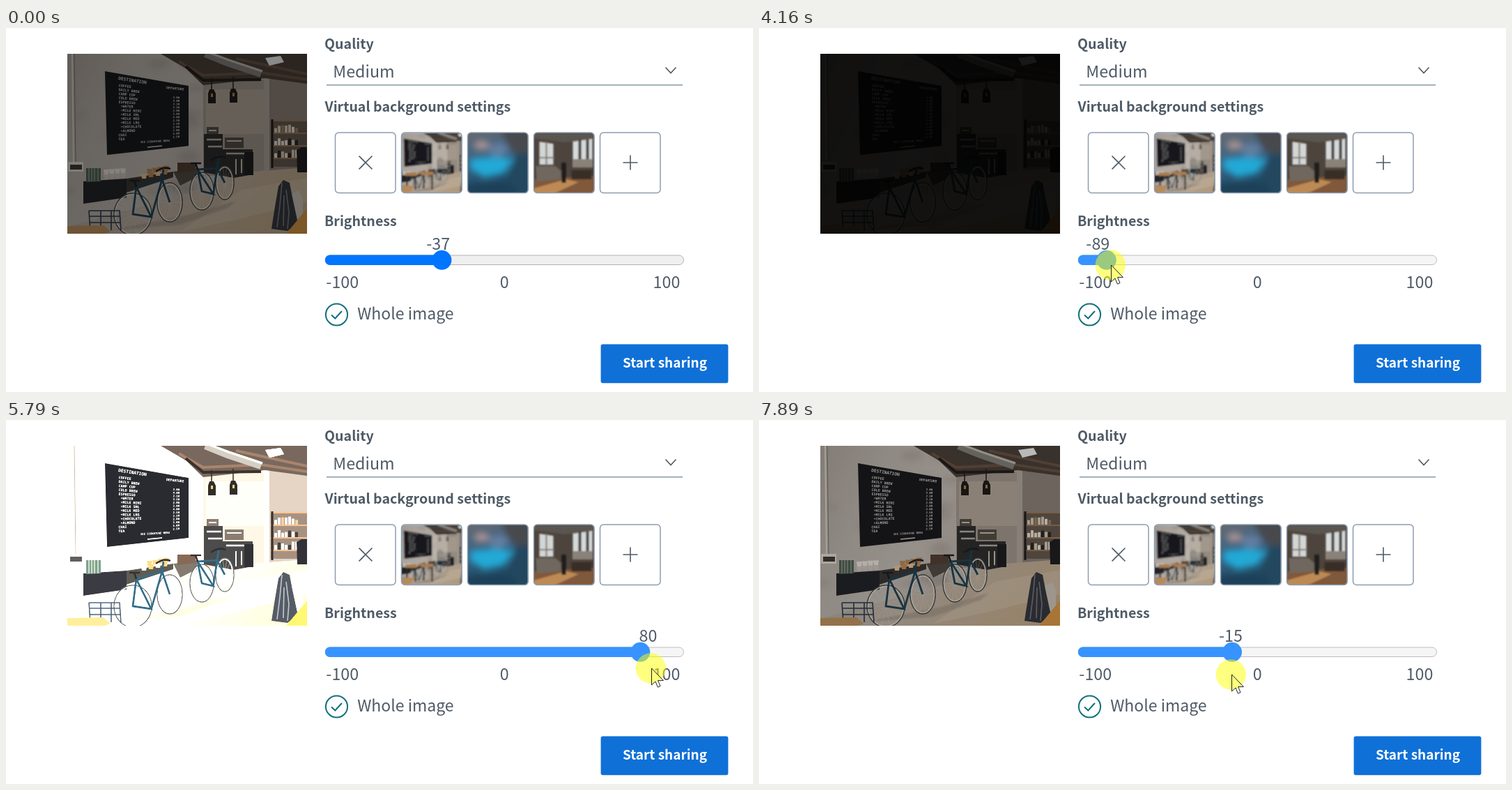
Animation, 1072 px wide and 522 px high, one loop 8 s. Source, as an HTML page:

```html
<!DOCTYPE html>
<html lang="en">
<head>
<meta charset="utf-8">
<title>Brightness slider</title>
<style>
  html, body { margin: 0; width: 100%; height: 100%; overflow: hidden; background: #fff; }
  svg { display: block; width: 1072px; height: 522px; }
  text { font-family: "Noto Sans CJK SC", "Noto Sans CJK JP", "Noto Sans CJK", "Open Sans", sans-serif; fill: #4e5a66; }
  .head { font-size: 19.6px; font-weight: 700; }
  .body { font-size: 23.3px; }
  .mid { text-anchor: middle; }
  .icon { fill: none; stroke: #4e5a66; stroke-width: 1.6; }
  .frame { fill: none; stroke: #8c9db0; stroke-width: 1.5; }
  #board text { font-family: "Noto Sans Mono", "DejaVu Sans Mono", monospace; font-weight: 700; fill: #bdbbb6; }
</style>
</head>
<body>
<svg viewBox="0 0 1072 522" xmlns="http://www.w3.org/2000/svg">
  <defs>
    <linearGradient id="wall" x2="1" y2=".35">
      <stop offset="0" stop-color="#9a928a"/><stop offset=".25" stop-color="#a8a19a"/>
      <stop offset=".5" stop-color="#b0a9a2"/><stop offset="1" stop-color="#a69d94"/>
    </linearGradient>
    <linearGradient id="floor" x2="1" y2=".3">
      <stop offset="0" stop-color="#989289"/><stop offset=".5" stop-color="#ada297"/><stop offset="1" stop-color="#b09a7e"/>
    </linearGradient>
    <linearGradient id="night" x2=".3" y2="1">
      <stop offset="0" stop-color="#66686f"/><stop offset=".5" stop-color="#386485"/><stop offset="1" stop-color="#1b4259"/>
    </linearGradient>
    <filter id="soft" x="-50%" y="-50%" width="200%" height="200%"><feGaussianBlur stdDeviation="5"/></filter>
    <filter id="slight"><feGaussianBlur stdDeviation=".8"/></filter>
    <clipPath id="photoClip"><rect x="88" y="37" width="344" height="258"/></clipPath>
    <clipPath id="tile"><rect width="87" height="87" rx="5"/></clipPath>

    <g id="photo">
      <rect x="88" y="37" width="344" height="258" fill="url(#wall)"/>
      <g id="stains" fill="#6f655b" fill-opacity=".22" filter="url(#soft)"/>
      <!-- back room and ceiling -->
      <path d="M283 74H432V212H283Z" fill="#938a80"/>
      <path d="M287 88H370V152H287Z" fill="#a2978b"/>
      <path d="M370 66H432V212H370Z" fill="#80766d"/>
      <path d="M370 66H378V208H370Z" fill="#a0978d"/>
      <path d="M222 37H432V80L372 72 283 82 258 58Z" fill="#433a34"/>
      <path d="M248 48 283 68 366 64 432 74M330 44 432 66" fill="none" stroke="#5e4a3c" stroke-width="4"/>
      <path d="M286 37 318 50 366 66" fill="none" stroke="#77736d" stroke-width="10"/>
      <path d="M288 34 320 46 368 62" fill="none" stroke="#aca69e" stroke-width="3"/>
      <path d="M258 55 283 75 366 74" fill="none" stroke="#211b18" stroke-width="4"/>
      <path d="M372 43 394 40 399 49 378 54Z" fill="#d9dbd9"/>
      <!-- floor -->
      <path d="M432 200 340 207 262 237 88 285V295H432Z" fill="url(#floor)"/>
      <path d="M338 232 432 215V250L330 275 250 292Z" fill="#c0b19d" opacity=".5"/>
      <path d="M150 290 262 268 330 248 318 258 250 282Z" fill="#6d655d" opacity=".3" filter="url(#slight)"/>
      <!-- cord and outlet -->
      <path d="M95 37 97 192" stroke="#c2beb8" stroke-width="2"/>
      <path d="M98 37 100 192" stroke="#6e6760" stroke-width="1"/>
      <rect x="89" y="192" width="22" height="14" fill="#c9c5bd"/>
      <path d="M92 196H109V203H92Z" fill="#383532"/>
      <!-- lamps -->
      <path d="M295 72V88M326 70V87" stroke="#1f1a18" stroke-width="1.5"/>
      <path d="M292 88H298L301 94V108H290V94ZM323 87H329L332 93V107H321V93Z" fill="#1c1918"/>
      <path d="M294 94H297V99H294ZM325 93H328V98H325Z" fill="#a8743d"/>
      <!-- counter -->
      <path d="M284 152H311V174H354V210L327 215 284 207Z" fill="#2b2a2a"/>
      <path d="M288 160H309M290 170H310M316 180H350" stroke="#a39d94" stroke-width="2.5"/>
      <path d="M288 142H305V152H288ZM314 157H341V172H314Z" fill="#4d463f"/>
      <path d="M317 162H338M291 147H302M330 188V210M338 188V208" stroke="#b5aca0" stroke-width="2"/>
      <path d="M342 178H355V211H342Z" fill="#1c1c1e"/>
      <!-- shelves -->
      <path d="M380 132H432V199H380Z" fill="#5d5148"/>
      <g id="goods"/>
      <path d="M380 133H432M380 151H432M380 169H432M380 187H432" stroke="#8b6d50" stroke-width="2"/>
      <path d="M382 131V201" stroke="#1d1b1a" stroke-width="3"/>
      <path d="M417 175 424 171H432V207H418Z" fill="#1c1c1f"/>
      <!-- ledge with cups -->
      <path d="M111 220 173 216V243L111 252Z" fill="#202125"/>
      <path d="M173 216 240 206V214L173 236Z" fill="#35332f"/>
      <path d="M240 206 274 201V214L250 226Z" fill="#4a443e"/>
      <path d="M115 201H136V220L115 221Z" fill="#465a50"/>
      <path d="M119 201V220M123 201V220M127 201V220M132 201V220" stroke="#a69e8e"/>
      <g id="cups"/>
      <path d="M246 193H272V205L246 208Z" fill="#4b3b2f"/>
      <!-- board -->
      <path d="M142 62 262 83V169L145 182Z" fill="#17181b"/>
      <g id="board"/>
      <g id="bikes" fill="none"/>
      <!-- chair, coat, tables -->
      <path d="M119 262H163L165 291M119 262 121 291M119 270H164M120 279H165M136 262V290M151 262V290" fill="none" stroke="#263446" stroke-width="1.6"/>
      <path d="M88 284 140 283 150 292 142 295H88Z" fill="#ad8557"/>
      <path d="M407 239 420 233 426 243V266L410 286Z" fill="#b9b1a6"/>
      <path d="M391 227 398 218 407 222 411 243 419 280 404 291 381 288 386 256Z" fill="#303338"/>
      <path d="M396 222 393 254 389 286M402 232 406 264 404 288M399 240 398 284" fill="none" stroke="#6d7074" stroke-width="1.6"/>
      <path d="M402 295 432 259V295Z" fill="#c58a40"/>
    </g>
  </defs>

  <g clip-path="url(#photoClip)"><g id="preview"><use href="#photo"/></g></g>

  <text class="head" x="457" y="29.5">Quality</text>
  <text class="body" x="469.3" y="71">Medium</text>
  <path d="M460 81.8H971" stroke="#9eacb9" stroke-width="2"/>
  <path class="icon" d="M946.5 56.5 954 64.5 961.5 56.5"/>
  <text class="head" x="457.5" y="119.5">Virtual background settings</text>

  <g transform="translate(567.5 150)" clip-path="url(#tile)">
    <g filter="url(#slight)">
      <use href="#photo" transform="translate(-15 0) scale(.338) translate(-88 -37)"/>
      <path d="M44 14H66V52H44Z" fill="#c4bcb4" opacity=".6"/>
      <path d="M8 60V80M20 60V82M32 58V80M44 60V82" stroke="#2b2c2f" stroke-width="2"/>
      <path d="M6 57H22V62H6ZM28 56H46V61H28Z" fill="#a87c4f"/>
      <path d="M0 76H20L12 87H0Z" fill="#b58a5c"/>
    </g>
  </g>
  <g transform="translate(662.5 150)" clip-path="url(#tile)">
    <rect width="87" height="87" fill="url(#night)"/>
    <g filter="url(#soft)">
      <path d="M45 -8H95V42L62 26Z" fill="#46494d"/>
      <path d="M70 30H95V95H50Z" fill="#21475f"/>
      <ellipse cx="20" cy="18" rx="11" ry="7" fill="#a58f92"/>
      <ellipse cx="44" cy="24" rx="14" ry="9" fill="#647ea0"/>
      <path d="M4 38 40 34 66 38 52 58 24 64 4 52Z" fill="#22a9d6"/>
      <ellipse cx="28" cy="82" rx="45" ry="9" fill="#1a4059"/>
    </g>
  </g>
  <g transform="translate(757.5 150)" clip-path="url(#tile)">
    <rect width="87" height="87" fill="#4d443d"/>
    <g filter="url(#slight)">
      <path d="M0 0H87V9L44 14 0 8Z" fill="#5a5550"/>
      <path d="M8 13 28 16V46H8Z" fill="#d3d6d6"/>
      <path d="M18 13V47M8 36H29" stroke="#7d756d" stroke-width="2"/>
      <path d="M56 13 84 9V50H56Z" fill="#d5dadb"/>
      <path d="M66 10V51M77 10V51" stroke="#463d37" stroke-width="4"/>
      <path d="M56 38H84V50H56Z" fill="#8a8279"/>
      <path d="M0 67 87 62V87H0Z" fill="#80583a"/>
      <path d="M0 80 46 67 64 71 30 87H0Z" fill="#bd8a54"/>
      <path d="M3 48H31L39 55V67L4 70Z" fill="#70675f"/>
      <path d="M40 43H46V72H40Z" fill="#1d1c1d"/>
      <path d="M54 54H83V67H54Z" fill="#382e28"/>
    </g>
  </g>
  <g id="frames"></g>
  <path class="icon" d="M506.5 183.5 525.5 202.5M525.5 183.5 506.5 202.5M885.5 193H906.5M896 182.5V203.5"/>

  <text class="head" x="457" y="284">Brightness</text>
  <text class="body mid" id="value" y="318"></text>
  <rect id="track" x="458.5" y="326" width="514" height="13.5" rx="6.75"/>
  <path id="fill"/>
  <circle id="thumb" cy="332.8" r="14"/>
  <text class="body mid" x="482.8" y="372.5">-100</text>
  <text class="body mid" x="715.3" y="372.5">0</text>
  <text class="body mid" x="948" y="372.5">100</text>

  <circle cx="474.5" cy="411" r="15.6" fill="none" stroke="#10707d" stroke-width="2"/>
  <path d="M467 411.5 472.3 416.5 482 406" fill="none" stroke="#10707d" stroke-width="2"/>
  <text class="body mid" x="573.4" y="417.5" style="font-size:23px">Whole image</text>
  <rect x="853.6" y="453.6" width="182.8" height="55.6" rx="3" fill="#0f70d7"/>
  <text class="head mid" x="945.5" y="487" style="font-size:19px;fill:#fff">Start sharing</text>

  <g id="cursor">
    <path id="arrow" d="M.5 0V24L6 19 9.4 27.2 13 25.6 9.6 17.6H17.4Z" fill="#fff"/>
    <circle cx="-.7" r="21.7" fill="#ff0" fill-opacity=".5"/>
    <use href="#arrow" style="fill-opacity:0" stroke="#222" stroke-width="1"/>
  </g>
</svg>
<script>
const LOOP = 8000, PRESS = 1550, LAG = 60;
const $ = id => document.getElementById(id);

function add(parent, tag, attrs, text) {
  const el = document.createElementNS('http://www.w3.org/2000/svg', tag);
  for (const key in attrs) el.setAttribute(key, attrs[key]);
  if (text) el.textContent = text;
  $(parent).append(el);
}

let seed = 7;
const rand = (a, b) => {
  seed = seed * 16807 % 2147483647;
  return a + (b - a) * seed / 2147483647;
};

function drawBoard() {
  const items = ['COFFEE', 'DAILY BREW', 'CAMP CUP', 'COLD BREW', 'ESPRESSO', '+WATER', '+MILK MINI',
    '+MILK SML', '+MILK MED', '+MILK LRG', '+CHOCOLATE', '+ALMOND', 'CHAI', 'TEA'];
  const line = (x, y, angle, size, text) =>
    add('board', 'text', { transform: `translate(${x} ${y}) rotate(${angle})`, 'font-size': size }, text);
  line(161, 74, 9, 6.2, 'DESTINATION');
  line(230, 87, 6, 4.7, 'DEPARTURE');
  items.forEach((item, i) => {
    const indent = item[0] === '+' ? 3 : 0;
    line(161.5 + indent, 84 + i * 5.95, 7 - i * .8, 5, item);
    if (i) line(239.5, 96 + i * 4.75, 4 - i * .6, 4, (2 + i * 7 % 5 * .5).toFixed(2));
  });
  line(193, 165, -3, 3.9, 'SEE SIGNATURE MENU');
  add('board', 'path', { d: 'M203 171 224 169', stroke: '#b5b3ae', 'stroke-width': 1.5 });
}

function drawBike(rear, front, saddle, bars) {
  for (const [x, y, rx, ry] of [rear, front]) {
    const rim = (grow, stroke, width) =>
      add('bikes', 'ellipse', { cx: x, cy: y, rx: rx + grow, ry: ry + grow, stroke, 'stroke-width': width });
    rim(0, '#3a3d3e', 1.5);
    rim(-1.5, '#c9c2b6', 1.5);
    for (let i = 0; i < 7; i++) {
      const a = i * Math.PI / 7, dx = rx * Math.cos(a), dy = ry * Math.sin(a);
      add('bikes', 'path', { d: `M${x - dx} ${y - dy}L${x + dx} ${y + dy}`, stroke: '#c8c0b4', 'stroke-width': .3 });
    }
  }
  const crank = [(rear[0] + front[0]) / 2, rear[1] + 4];
  const post = [saddle[0] + 3, saddle[1] + 9], head = [bars[0] - 2, bars[1] + 14];
  const [r, f] = [rear, front].map(w => w.slice(0, 2));
  add('bikes', 'path', { d: `M${r}L${post}L${crank}ZM${post}L${head}L${crank}M${bars}L${head}L${f}`, stroke: '#1d3d4d', 'stroke-width': 2.8 });
  add('bikes', 'path', { d: `M${saddle}L${post}M${saddle[0] - 7} ${saddle[1]}h15M${bars[0] - 11} ${bars[1] + 3}Q${bars[0]} ${bars[1] - 5} ${bars[0] + 10} ${bars[1] - 1}`, stroke: '#1b1c1e', 'stroke-width': 2.6 });
}

function drawDetails() {
  for (let i = 0; i < 26; i++)
    add('stains', 'ellipse', { cx: rand(92, 275), cy: rand(40, 250), rx: rand(4, 22), ry: rand(3, 13) });
  for (let row = 0; row < 3; row++)
    for (let x = 385; x < 416; x += 5) {
      const h = rand(6, 12);
      add('goods', 'rect', { x, y: 150 + row * 18 - h, width: 4, height: h, fill: ['#c1b6a5', '#8d745a', '#272523', '#d6cec0'][Math.floor(rand(0, 4))] });
    }
  const cup = (x, y, fill) => add('cups', 'path', { d: `M${x} ${y}h8l-1 7h-6z`, fill });
  for (let i = 0; i < 4; i++) {
    cup(140 + i * 8, 203 - i * .6, '#d2cdc4');
    cup(140 + i * 8, 210 - i * .6, '#b9b2a8');
    cup(194 + i * 10, 209 - i * 2, i % 2 ? '#b47d46' : '#d0b18d');
    cup(202 + i * 8, 202 - i * 1.5, '#a67b50');
  }
  drawBoard();
  drawBike([281, 234, 17, 27], [314, 222, 13, 24], [272, 194], [305, 187]);
  drawBike([182, 267, 27, 30], [235, 250, 18, 28], [184, 219], [226, 203]);
  for (let i = 0; i < 5; i++)
    add('frames', 'rect', { class: 'frame', x: 472.5 + i * 95, y: 150, width: 86.5, height: 86.5, rx: 5 });
}

// Bursts of screen updates: start, end, number of updates
const bursts = [
  [720, 1480, 12], [1550, 1620, 2], [2090, 2310, 4], [2580, 2650, 2], [2840, 3610, 12], [3690, 3890, 4],
  [4160, 4900, 12], [4970, 5720, 12], [5790, 6320, 9], [6530, 7280, 12], [7350, 7690, 6], [7890, 7890, 1]
];

// Pointer path: time, x, y
const path = [
  [720, 652, 520], [1100, 640, 430], [1480, 630, 343], [1620, 628, 331], [2090, 626, 330], [2250, 624, 329],
  [2580, 624, 330], [2840, 620, 331], [3610, 509, 334], [3820, 500, 336], [4100, 500, 337], [4160, 505, 340],
  [4900, 681, 381], [5114, 732, 379], [5174, 746, 379], [5400, 806, 385], [5720, 904, 360], [5730, 911.5, 359],
  [5790, 926, 356], [6320, 1022, 350], [6470, 1022, 350], [6743, 907, 351], [6803, 876, 352],
  [7000, 802, 364], [7280, 723, 375], [7620, 680, 366], [7830, 680, 365], [7890, 678, 365]
];

function lastUpdate(t) {
  let at = 0;
  for (const [start, end, count] of bursts) {
    if (t < start) break;
    const step = (end - start) / (count - 1 || 1);
    at = start + Math.min(count - 1, Math.floor((t - start) / (step || 1))) * step;
  }
  return at;
}

function pointer(t) {
  const i = path.findIndex(key => key[0] > t);
  if (i < 0) return path[path.length - 1].slice(1);
  if (!i) return path[0].slice(1);
  const [t0, x0, y0] = path[i - 1], [t1, x1, y1] = path[i], k = (t - t0) / (t1 - t0);
  return [x0 + (x1 - x0) * k, y0 + (y1 - y0) * k];
}

function sliderValue(t) {
  if (t < PRESS) return -37;
  const v = (pointer(t - LAG)[0] - 473) / 487 * 200 - 100;
  return Math.round(Math.max(-100, Math.min(100, v)));
}

const looks = {
  rest: ['#0075ff', '#efefef', '#b2b2b2'],
  hover: ['#005cc8', '#e5e5e5', '#a0a0a0'],
  active: ['#3793ff', '#f5f5f5', '#bebebe']
};

function render(time) {
  const t = lastUpdate(time), [x, y] = pointer(t);
  const v = sliderValue(t), part = (v + 100) / 200, cx = 472 + 487 * part;
  const [accent, track, edge] = looks[t >= PRESS ? 'active' : t >= 720 && y < 347 ? 'hover' : 'rest'];
  $('value').textContent = v;
  $('value').setAttribute('x', 458 + 515 * part);
  $('track').setAttribute('fill', track);
  $('track').setAttribute('stroke', edge);
  $('fill').setAttribute('d', `M${cx} 325.5H465a7.2 7.2 0 0 0 0 14.5H${cx}Z`);
  $('fill').setAttribute('fill', accent);
  $('thumb').setAttribute('cx', cx);
  $('thumb').setAttribute('fill', accent);
  $('preview').style.filter = `brightness(${(100 + (t < 2580 ? -37 : v)) / 100})`;
  $('cursor').setAttribute('transform', `translate(${x} ${y})`);
  $('cursor').style.display = t < 720 ? 'none' : '';
}

drawDetails();
const begin = performance.now();
function tick() {
  render((performance.now() - begin) % LOOP);
  requestAnimationFrame(tick);
}
tick();
</script>
</body>
</html>
```
